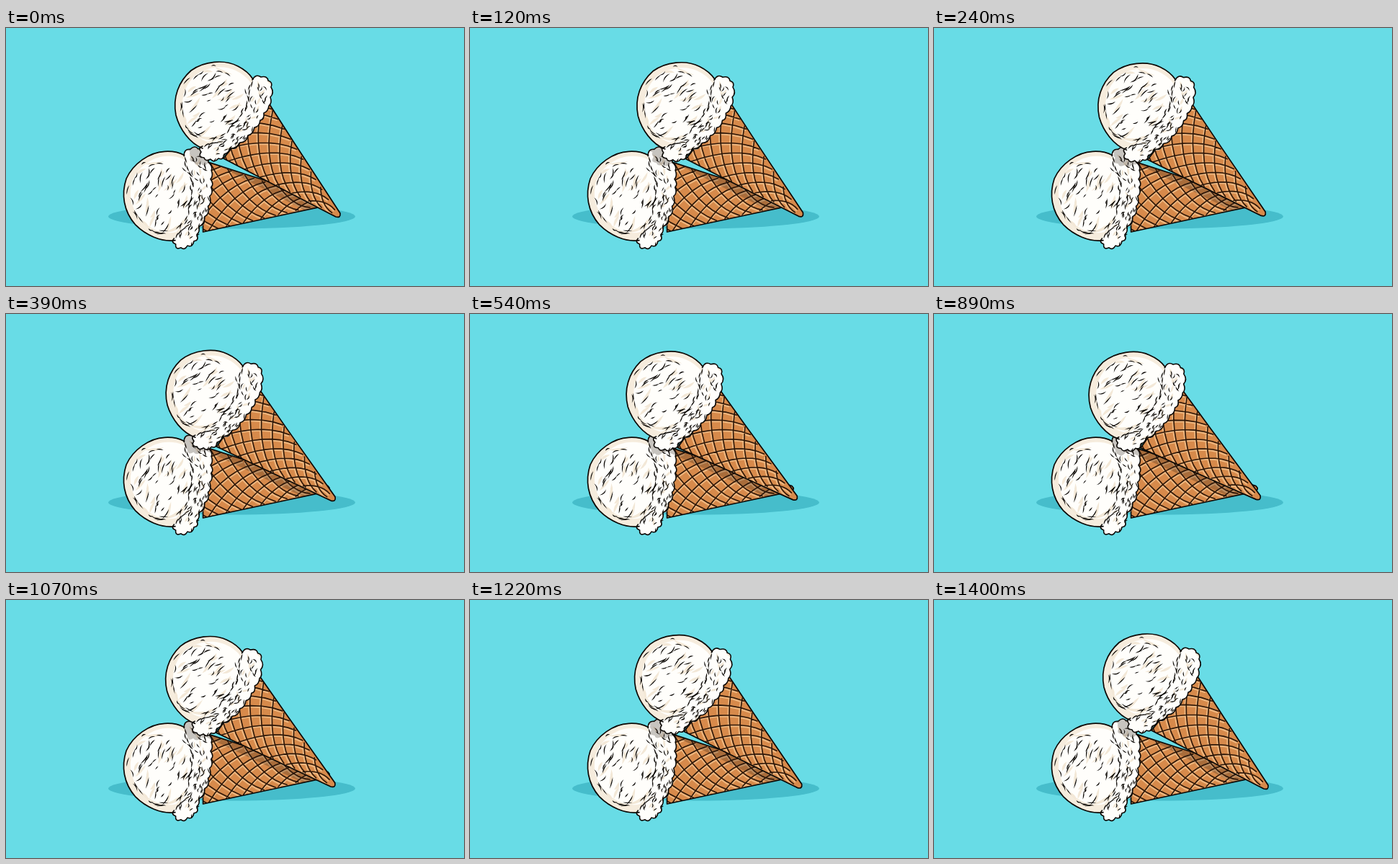
Animation of 636 by 358 pixels, one loop 1.6 s. Source, as an HTML page with a canvas:

```html
<!DOCTYPE html>
<html lang="en">
<head>
<meta charset="utf-8">
<title>Ice cream cones</title>
<style>
html, body { margin: 0; height: 100%; overflow: hidden; background: #68dce6; }
canvas { display: block; }
</style>
</head>
<body>
<canvas width="636" height="358"></canvas>
<script>
const ctx = document.querySelector('canvas').getContext('2d');
const LOOP = 1600, STEP = 30;
const TIP = [462, 261], RIGHT = [366, 108], LEFT = [302, 181], FRILL = [322, 125];
const INK = '#0b0805';

const scoop = new Path2D('M273 167C255 160 241 140 236 121C231 96 240 74 257 59C275 46 303 43 322 53Q336 60 343 71L350 110L320 150Z');
const scoopEdge = new Path2D('M273 167C255 160 241 140 236 121C231 96 240 74 257 59C275 46 303 43 322 53Q336 60 343 71');
const scoopLight = new Path2D('M280 158C262 152 250 136 246 118C242 98 249 78 263 66C279 53 303 51 319 59Q332 65 340 76L345 110L318 145Z');
const frillEdge = 'M342 72Q347 63 354 68Q363 66 364 73Q371 75 368 82Q373 90 367 96Q370 104 365 108Q364 116 358 118Q359 127 353 128Q352 137 345 138Q343 148 336 149Q334 159 325 159Q320 168 311 167Q309 174 303 175Q302 184 295 181Q289 188 284 182Q277 186 275 180Q266 179 271 172Q266 166 273 164';
const frill = new Path2D(frillEdge + 'Q296 157 306 142Q327 125 331 101Q342 90 342 72Z');
const frillLine = new Path2D(frillEdge);
const cone = new Path2D('M366 106L400 159L464 257Q465 264 458 262L400 232L302 181L335 140Z');

let seed = 11;
const rand = () => (seed = seed * 16807 % 2147483647) / 2147483647;
const spread = d => (rand() * 2 - 1) * d;

// Point and direction on a quadratic curve
function along(a, c, b, t) {
  const at = i => (1 - t) ** 2 * a[i] + 2 * t * (1 - t) * c[i] + t * t * b[i];
  const slope = i => (1 - t) * (c[i] - a[i]) + t * (b[i] - c[i]);
  return { x: at(0), y: at(1), angle: Math.atan2(slope(1), slope(0)) };
}

// Tapered, slightly bent brush mark
function mark(x, y, angle, length, width, bend) {
  const path = new Path2D(), h = length / 2;
  const cos = Math.cos(angle), sin = Math.sin(angle);
  const put = (u, v) => [x + u * cos - v * sin, y + u * sin + v * cos];
  path.moveTo(...put(-h, 0));
  path.quadraticCurveTo(...put(0, bend - width), ...put(h, 0));
  path.quadraticCurveTo(...put(0, bend + width), ...put(-h, 0));
  return path;
}

function scoopMark(min, max, length, width) {
  const turn = rand() * 2 * Math.PI, r = Math.sqrt(min * min + rand() * (max * max - min * min));
  const x = 288 + 50 * r * Math.cos(turn), y = 107 + 56 * r * Math.sin(turn);
  const angle = r > .78 ? turn + Math.PI / 2 + spread(.2) : -.6 + spread(.4);
  return mark(x, y, angle, length + spread(length * .4), width, spread(4));
}

function frillMark(length, width) {
  const p = along([355, 76], [352, 150], [283, 175], rand()), off = spread(11);
  return mark(p.x - off * Math.sin(p.angle), p.y + off * Math.cos(p.angle),
    p.angle + spread(.9), length + spread(2), width, spread(4));
}

const many = (n, make) => Array.from({ length: n }, make);
const cream = [
  ...many(24, () => scoopMark(.3, .92, 19, 3.6)),
  ...many(18, () => frillMark(10, 3))
];
const dashes = [
  ...many(34, () => scoopMark(.35, .78, 12, 1.4)),
  ...many(4, () => scoopMark(.05, .35, 10, 1.2)),
  ...many(24, () => scoopMark(.82, .98, 10, 1.3)),
  ...many(52, () => frillMark(8, 1.3)),
  ...many(17, (_, i) => {
    const p = along([341, 73], [335, 135], [274, 164], (i + .5) / 17);
    return mark(p.x + spread(2), p.y + spread(2), p.angle + spread(.4), 10, 1.5, spread(3));
  })
];

// Two crossing families of waffle ridges
const ridges = new Path2D();
for (const lean of [-.55, .55]) {
  for (let base = .16; base < 1.5; base += .115) {
    for (let v = 0; v <= 1.001; v += .125) {
      const s = base + lean * (v - .5) * (.25 + .75 * base) + .1 * base * v * (1 - v);
      const [x, y] = [0, 1].map(i => TIP[i] + s * (RIGHT[i] + (LEFT[i] - RIGHT[i]) * v - TIP[i]));
      v ? ridges.lineTo(x, y) : ridges.moveTo(x, y);
    }
  }
}

function paint(path, fill, stroke, width) {
  if (fill) { ctx.fillStyle = fill; ctx.fill(path); }
  if (stroke) { ctx.strokeStyle = stroke; ctx.lineWidth = width; ctx.stroke(path); }
}

// Transform for the scoop, which may sit turned on its cone
function seat({ x, y, turn }) {
  return new DOMMatrix()
    .translate(FRILL[0] + x, FRILL[1] + y)
    .rotate(turn)
    .translate(-FRILL[0], -FRILL[1]);
}

function iceCream(seating) {
  ctx.save();
  ctx.clip(cone);
  paint(cone, '#d78a4b');
  ctx.translate(-1.7, 1.7);
  paint(ridges, null, '#edb780', 2);
  ctx.translate(1.7, -1.7);
  paint(ridges, null, '#2d1708', 1.6);
  ctx.restore();
  paint(cone, null, INK, 1.7);

  ctx.save();
  const m = seating;
  ctx.transform(m.a, m.b, m.c, m.d, m.e, m.f);
  paint(scoop, '#f6ecdd');
  paint(scoopLight, '#fffefb');
  paint(frill, '#fffefb');
  cream.forEach(c => paint(c, '#f3e8d7'));
  paint(scoopEdge, null, INK, 1.7);
  paint(frillLine, null, INK, 1.6);
  dashes.forEach(d => paint(d, INK));
  ctx.restore();
}

function pose(x, y, angle) {
  ctx.translate(TIP[0] + x, TIP[1] + y);
  ctx.rotate(angle);
  ctx.translate(-TIP[0], -TIP[1]);
}

function tilt(time) {
  const ease = u => (u + u * u * (3 - 2 * u)) / 2;
  const steps = (from, count) => ease(Math.max(0, Math.min(1, Math.floor((time - from) / STEP) / count)));
  return steps(0, 22) - steps(860, 18);
}

const upperSeat = seat({ x: 0, y: 0, turn: 0 });
const lowerSeat = seat({ x: -2, y: 7, turn: 9.5 });
const lower = [-14, -18, -.689];
const shaded = new Path2D(cone);
shaded.addPath(frill, lowerSeat);
const shapes = [scoop, frill, cone];
const caster = new Path2D();
shapes.forEach(s => caster.addPath(s));

function draw(now) {
  const p = tilt(now % LOOP);
  const upper = [-11 * p, -5 * p, -.062 * p];

  ctx.fillStyle = '#68dce6';
  ctx.fillRect(0, 0, 636, 358);
  ctx.fillStyle = '#46bdcb';
  ctx.beginPath();
  ctx.ellipse(313.5, 261.5, 171.5, 17, 0, 0, 2 * Math.PI);
  ctx.fill();

  ctx.save();
  pose(...lower);
  iceCream(lowerSeat);
  // Shade cast on the lower cone by the upper one
  ctx.clip(shaded);
  ctx.setTransform(1, 0, 0, 1, -14, 6);
  pose(...upper);
  paint(caster, 'rgba(35,22,14,.25)');
  ctx.restore();

  ctx.save();
  pose(...upper);
  iceCream(upperSeat);
  ctx.restore();
}

ctx.lineJoin = ctx.lineCap = 'round';
const start = performance.now();
function tick() {
  draw(performance.now() - start);
  requestAnimationFrame(tick);
}
tick();
</script>
</body>
</html>
```
